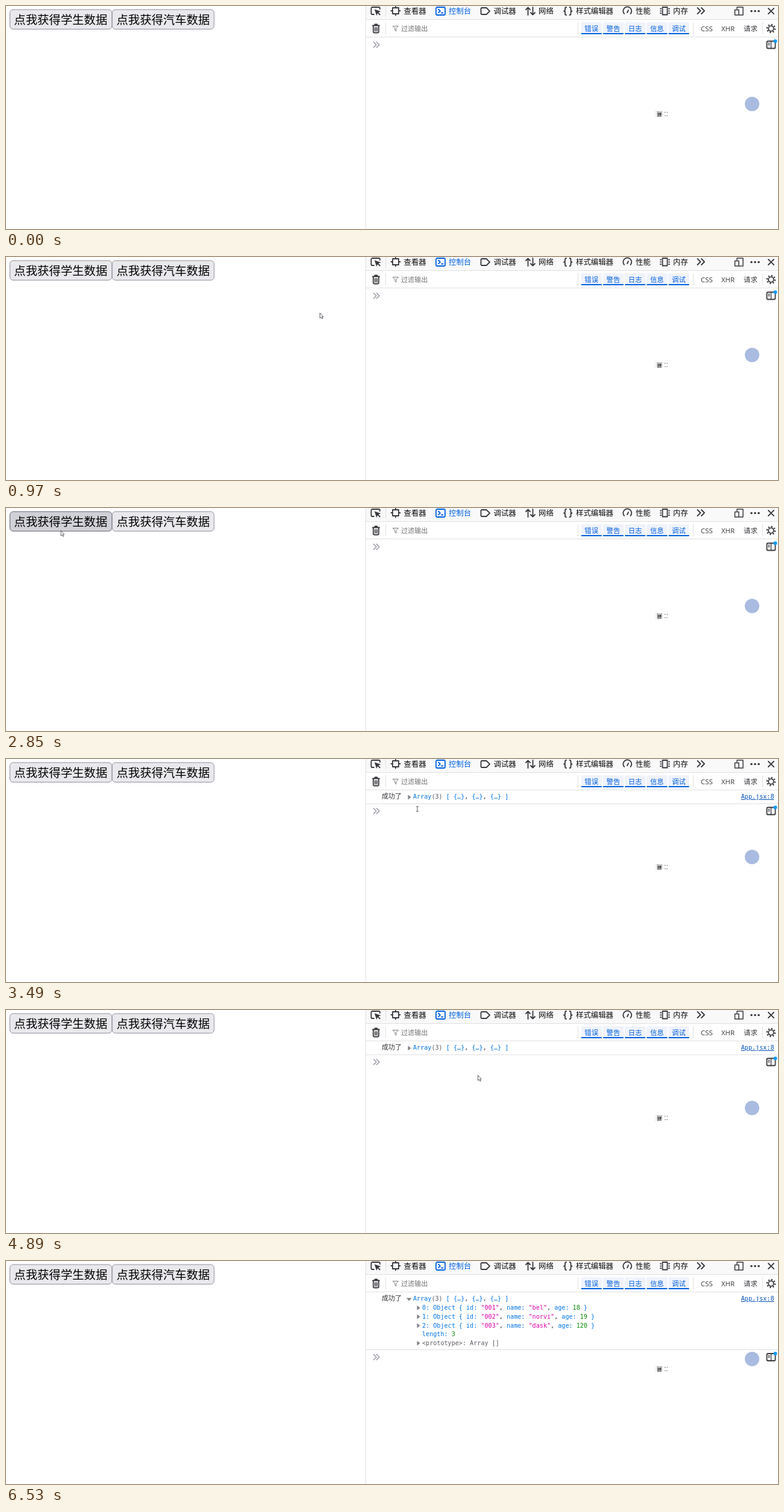
Write an HTML page that moves like this. It is 1280 px wide and 371 px high and loops after 7.27 s.

```html
<!DOCTYPE html>
<html lang="zh-CN">
<head>
<meta charset="utf-8">
<style>
  html, body { margin: 0; width: 100%; height: 100%; overflow: hidden; background: #fff; }
  svg { display: block; width: 1280px; height: 371px; }
  text { font: 12.4px "Open Sans", "Noto Sans CJK SC", "Noto Sans CJK", sans-serif; fill: #0c0c0d; white-space: pre; }
  .btn rect { fill: #e9e9ed; stroke: #8f8f9d; }
  .btn.hover rect { fill: #d0d0d7; stroke: #676774; }
  .btn text { font-size: 19.35px; fill: #000; }
  .icon { fill: none; stroke: #38383d; stroke-width: 1.8; stroke-linejoin: round; stroke-linecap: round; }
  .solid { fill: #38383d; stroke: none; }
  .blue { stroke: #0060df; }
  .small text { font-size: 11.4px; fill: #38383d; }
  .small .on { fill: #0060df; }
  .line { stroke: #e0e0e2; fill: none; }
  .mono text { font: 10.12px "DejaVu Sans Mono", "Noto Sans CJK SC", "Noto Sans CJK", monospace; fill: #0074e8; }
  .mono .dark { fill: #38383d; }
  .mono .grey { fill: #5c5c66; }
  .mono .str { fill: #dd00a9; }
  .mono .num { fill: #058b00; }
  .tri { fill: #808087; }
</style>
</head>
<body>
<svg viewBox="0 0 1280 371">
  <g class="btn"><rect x="6.5" y="6" width="169" height="32.5" rx="5.5"/><text x="13.3" y="30">点我获得学生数据</text></g>
  <g class="btn"><rect x="176" y="6" width="169" height="32.5" rx="5.5"/><text x="183.2" y="30">点我获得汽车数据</text></g>

  <rect x="597" width="683" height="22" fill="#f9f9fa"/>
  <path class="line" d="M596.5 0V371M597 22.5H1280M597 51.5H1280M629.5 0V18M629.5 27V47M948.5 27V47M1139.5 27V47M1254.5 27V47"/>

  <g class="icon">
    <path d="M610 14H607.5a2 2 0 0 1-2-2V4a2 2 0 0 1 2-2H618a2 2 0 0 1 2 2V5"/>
    <path class="solid" d="M611 5.500l10.500 3.500-4 1.700 3.500 3.400-1.400 1.400-3.500-3.400-1.700 4z"/>
    <path d="M641 3h10v10h-10zM638.500 8h2.500M651 8h2.500M646 .5v2.500M646 13v2.500"/>
    <path class="blue" d="M715 2h11a2 2 0 0 1 2 2v9a2 2 0 0 1-2 2h-11a2 2 0 0 1-2-2v-9a2 2 0 0 1 2-2zM717 5.500l3 2.800-3 2.800M722 11.500h2.500"/>
    <path d="M789 3h7.500l5.500 5.500-5.500 5.500h-7.500a1.500 1.500 0 0 1-1.500-1.500v-8a1.500 1.500 0 0 1 1.500-1.500z"/>
    <path d="M865.500 15V2.500M862 6l3.500-3.500 3.500 3.500M873.500 2V14.500M870 11l3.500 3.500 3.500-3.500"/>
    <path d="M929 2q-2 0-2 2v2.500q0 2-2 2 2 0 2 2v2.500q0 2 2 2M934.500 2q2 0 2 2v2.500q0 2 2 2-2 0-2 2v2.500q0 2-2 2"/>
    <path d="M1025 13a7 7 0 1 1 10.500 0M1030 11l2-4"/>
    <path d="M1088.500 2h8v12.500h-8zM1086 4.500h-1M1086 8.300h-1M1086 12h-1M1099 4.500h1M1099 8.300h1M1099 12h1"/>
    <path d="M1146.500 3l5 5-5 5M1153 3l5 5-5 5"/>
    <path d="M1212 5V2h10v13h-6M1208.500 6.500h6.500v8.500h-6.500z" stroke-width="1.500"/>
    <path d="M1264 4l9 9M1273 4l-9 9"/>
    <path d="M608 32.500h11M611.500 32v-1.500h4v1.500M609 33v10a1.500 1.500 0 0 0 1.500 1.500h6a1.500 1.500 0 0 0 1.500-1.500v-10M612 36v5.500M615 36v5.500"/>
    <path d="M641.500 33.500h9l-3.500 4v4.500l-2-1.500v-3z" stroke="#808087" stroke-width="1"/>
    <circle cx="1268.500" cy="37.500" r="4.300"/>
    <circle cx="1268.500" cy="37.500" r="6.600" stroke-width="2.400" stroke-dasharray="2.200 2.983" stroke-linecap="butt"/>
  </g>
  <g class="solid"><circle cx="1236" cy="8.500" r="1.800"/><circle cx="1242" cy="8.500" r="1.800"/><circle cx="1248" cy="8.500" r="1.800"/></g>

  <g id="tabs"></g>
  <g id="filters" class="small"></g>

  <g id="log" class="mono">
    <text class="dark" x="623" y="66" style="font-size:11px">成功了</text>
    <text x="675" y="66">Array<tspan class="grey">(3)</tspan> [ {…}<tspan class="dark">,</tspan> {…}<tspan class="dark">,</tspan> {…} ]</text>
    <text x="1273.500" y="66" text-anchor="end" text-decoration="underline" style="fill:#0050b8">App.jsx:8</text>
    <path id="closed" class="tri" d="M666.500 59.500v8l5-4z"/>
    <g id="open"><path class="tri" d="M664 61.500h8.500l-4.250 5z"/></g>
  </g>
  <path id="rule" class="line"/>
  <g id="prompt" class="icon">
    <path d="M609.500 60l4.500 4.500-4.500 4.500M614.500 60l4.500 4.500-4.500 4.500" stroke="#8f8f9d" stroke-width="1.300"/>
    <rect x="1261.500" y="58.500" width="14" height="12" rx="2"/>
    <path d="M1268.500 59v11M1264 62h2M1264 64.500h2" stroke-width="1.300"/>
    <circle cx="1275.500" cy="58.500" r="3" fill="#0a9bff" stroke="none"/>
  </g>

  <circle cx="1237" cy="163" r="12" fill="#a9bbe0"/>
  <path d="M1076.500 174V185" stroke="#ddd" stroke-dasharray="1 1"/>
  <rect x="1079.500" y="175.500" width="8" height="8" fill="none" stroke="#777" stroke-width=".6"/>
  <text x="1080" y="182.500" style="font-size:7px;font-weight:bold">拼</text>
  <path d="M1092.500 178v-1.500h1M1096.500 178v-1.500h-1M1092 182.500h2M1095 182.500h2" fill="none" stroke="#666" stroke-width=".8"/>

  <g id="cursor" stroke="#50505a" stroke-width=".9">
    <path id="arrow" fill="#fff" d="M.5.5V9.300L2.500 7.500 4 10.500 5.300 9.900 4 7H6.200Z"/>
    <path id="beam" fill="none" d="M-2-4H2M0-4V4M-2 4H2"/>
  </g>
</svg>
<script>
const $ = id => document.getElementById(id);
const show = (id, on) => $(id).style.display = on ? '' : 'none';

const tabs = { 查看器: 659.5, 控制台: 734, 调试器: 808.5, 网络: 883, 样式编辑器: 945, 性能: 1044, 内存: 1106 };
$('tabs').innerHTML = Object.entries(tabs).map(([name, x]) =>
  `<text x="${x}" y="13"${name === '控制台' ? ' style="fill:#0060df"' : ''}>${name}</text>`).join('');

$('filters').innerHTML = '<text x="655" y="41.5" style="font-size:11.1px;fill:#737373">过滤输出</text>' +
  ['错误', '警告', '日志', '信息', '调试'].map((name, i) => {
    const x = 953.5 + i * 36.2;
    return `<rect x="${x}" y="27" width="34.500" height="20" rx="2" fill="#f0f3fb"/>
      <rect x="${x}" y="45" width="34.500" height="2" rx="1" fill="#0060df"/>
      <text class="on" x="${x + 17.2}" y="41.5" text-anchor="middle">${name}</text>`;
  }).join('') +
  [['CSS', 1152], ['XHR', 1186], ['请求', 1223]].map(([s, x]) => `<text x="${x}" y="41.5">${s}</text>`).join('');

// Expanded array: one line per entry
const span = (cls, s) => `<tspan class="${cls}">${s}</tspan>`;
const comma = span('dark', ',');
const lines = [['bel', 18], ['norvi', 19], ['dask', 120]].map(([name, age], i) =>
  `${i}: Object { id: ${span('str', `"00${i + 1}"`)}${comma} name: ${span('str', `"${name}"`)}${comma} age: ${span('num', age)} }`);
lines.push('length: ' + span('num', 3), span('grey', '&lt;prototype&gt;: Array []'));
$('open').innerHTML += lines.map((s, i) => {
  const y = 77.5 + i * 14.7;
  return (i === 3 ? '' : `<path class="tri" d="M681.500 ${y - 3.5}v8l5-4z"/>`) + `<text x="690" y="${y + 3.8}">${s}</text>`;
}).join('');

// Pointer path: time, x, y
const path = [
  [80, 1049, 318], [160, 900, 236], [240, 690, 150], [320, 490, 88], [400, 350, 46], [480, 300, 34], [560, 288, 30], [720, 288, 30],
  [890, 400, 60], [1050, 640, 125], [1210, 726, 146], [1370, 712, 130], [1530, 689, 108], [1690, 640, 82], [1770, 632, 78],
  [2100, 610, 74], [2180, 540, 62], [2260, 445, 49], [2340, 280, 44], [2430, 130, 38], [2520, 92, 36], [2770, 90, 37],
  [3090, 92, 37], [3170, 120, 43], [3330, 500, 72], [3410, 650, 82], [3490, 682, 83],
  [3570, 674, 82], [3730, 500, 70], [3890, 260, 50], [4050, 120, 35], [4210, 70, 14], [4290, 59, -7],
  [4720, 129, 5], [4800, 492, 62], [4880, 782, 108], [5040, 740, 92], [5200, 684, 68], [5380, 668, 62],
  [5630, 668, 62], [5790, 760, 100], [5950, 980, 210], [6120, 1177, 300], [6280, 1210, 328], [6440, 1251, 362], [6530, 1262, 375]
];
const logAt = 3010, openAt = 5550, loop = 7270;
const ticks = [0, 810, 2100, 2340, 2430, 2770, 4390, 4720, 5470, 6120];

function pointer(t) {
  const i = path.findIndex(p => p[0] > t);
  if (i < 0) return path.at(-1).slice(1);
  if (i === 0) return path[0].slice(1);
  const [a, b] = [path[i - 1], path[i]], k = (t - a[0]) / (b[0] - a[0]);
  return [1, 2].map(n => a[n] + (b[n] - a[n]) * k);
}

function draw(now) {
  const time = now % loop, base = ticks.findLast(s => s <= time);
  const t = base + Math.floor((time - base) / 80) * 80;
  const [x, y] = pointer(t);
  const logged = t >= logAt, opened = t >= openAt;
  const visible = t >= 80 && t < 4390 || t >= 4720 && t < 6530;
  const shift = opened ? 95.5 : logged ? 22 : 0;
  const typing = x > 625 && Math.abs(y - 64.5 - shift) < 11;

  show('log', logged);
  show('closed', !opened);
  show('open', opened);
  $('rule').setAttribute('d', logged ? `M597 ${opened ? 147.5 : 74.5}H1280` : '');
  $('prompt').setAttribute('transform', `translate(0 ${shift})`);
  show('cursor', visible);
  show('arrow', !typing);
  show('beam', typing);
  $('cursor').setAttribute('transform', `translate(${x} ${y})`);
  document.querySelectorAll('.btn').forEach((b, i) => {
    const left = 6 + i * 169.5;
    b.classList.toggle('hover', visible && x > left && x < left + 169.5 && y > 5 && y < 39);
  });
}

const start = performance.now();
(function tick() {
  draw(performance.now() - start);
  requestAnimationFrame(tick);
})();
</script>
</body>
</html>
```
